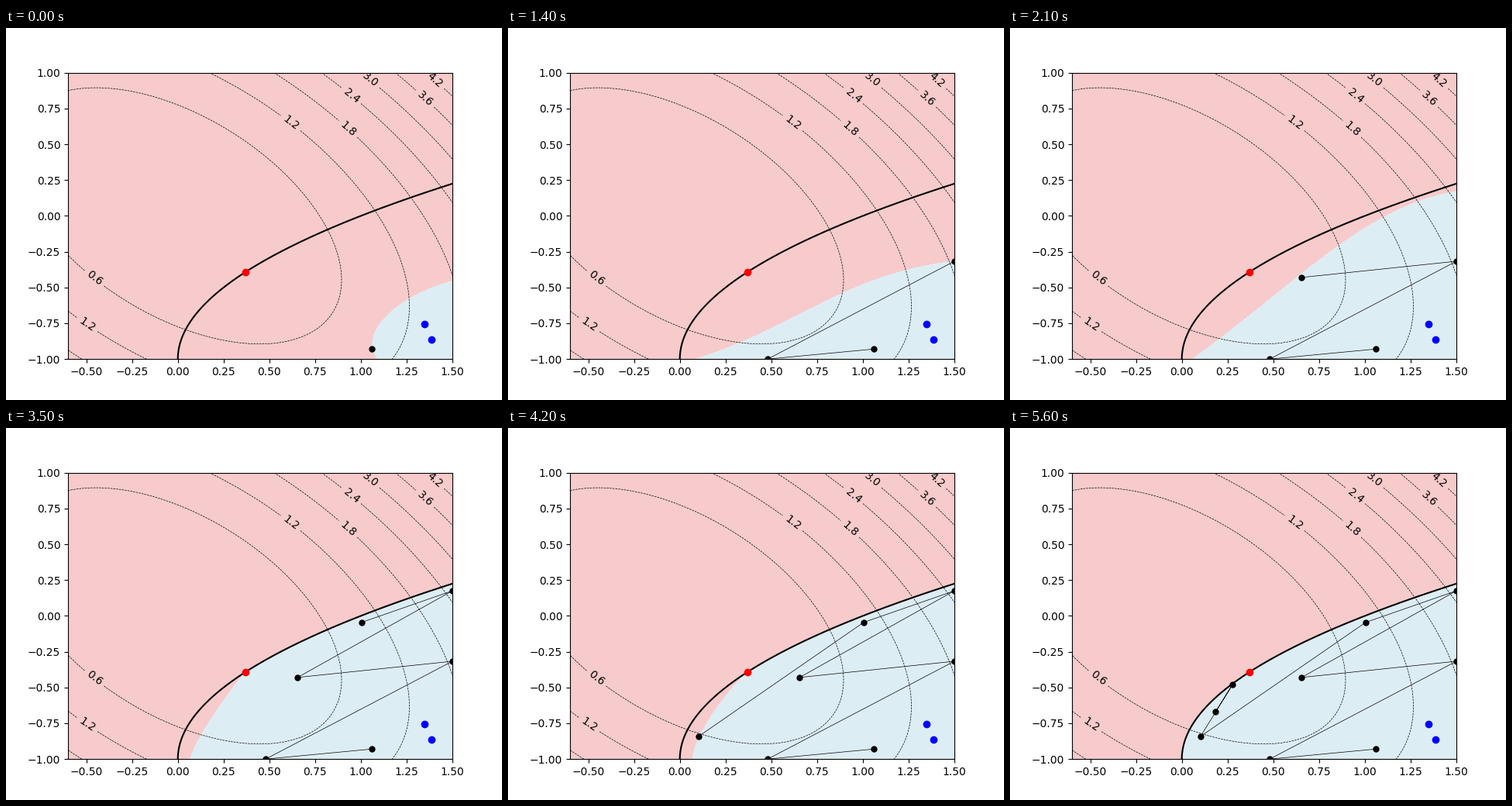
A matplotlib script for the animation above (6300 ms loop, 640x480 px).

```python
import numpy as np
import matplotlib.pyplot as plt
from matplotlib.animation import FuncAnimation

PINK, SKY = "#f7cbcb", "#ddedf4"
STEP_MS = 700
X_MIN, X_MAX = -0.6, 1.5

# The constraint curve is x = u^2, y = u - 1
U_END = np.sqrt(X_MAX)
Y_END = U_END - 1
# Minimum of x^2 + xy + y^2 along it
U_BEST = max(r.real for r in np.roots([4, 3, 0, -2]) if abs(r.imag) < 1e-9)
BEST = (U_BEST**2, U_BEST - 1)

# Sampled points, one more shown per step
PATH = np.array([
    (1.06, -0.93), (0.48, -1.0), (X_MAX, -0.317), (0.654, -0.43), (X_MAX, 0.175),
    (1.005, -0.045), (0.102, -0.842), (0.277, -0.48), (0.184, -0.67),
])
KNOWN = np.array([(1.348, -0.757), (1.386, -0.866)])


def bezier(ctrl):
    t = np.linspace(0, 1, 120)[:, None]
    pts = [np.array(p) * np.ones_like(t) for p in ctrl]
    while len(pts) > 1:
        pts = [a + (b - a) * t for a, b in zip(pts, pts[1:])]
    return pts[0]


def joint(u, v):
    """Where the constraint curve's tangents at u and v cross."""
    return (u * v, (u + v) / 2 - 1)


def spread(*ctrl):
    """Safe region whose edge runs straight to the right border."""
    return np.vstack([bezier(ctrl), (X_MAX, -1)])


def hug(*ctrl, top=Y_END):
    """Safe region whose edge meets the optimum, then follows the constraint."""
    tail = bezier([BEST, joint(U_BEST, U_END), (X_MAX, top)])
    return np.vstack([bezier([*ctrl, BEST]), tail, (X_MAX, -1)])


REGIONS = [
    spread((1.094, -1), (.99, -.84), (1.16, -.58), (X_MAX, -.455)),
    spread(PATH[1], (.8, -.83), (1.15, -.53), (X_MAX, -.395)),
    spread((.09, -1), (.65, -.77), (.9, -.41), PATH[2]),
    spread((.06, -1), (.66, -.44), (1, .06), (X_MAX, .17)),
    hug((.055, -1), (.19, -.83), (.3, -.58), top=PATH[4, 1]),
    hug((.068, -1), (.11, -.83), (.27, -.55)),
    hug((.07, -1), (.08, -.83), (.25, -.54)),
    hug((.01, -1), (.01, -.7)),
    hug((0, -1), joint(0, U_BEST)),
]

fig, ax = plt.subplots(figsize=(6.4, 4.8), dpi=100)
ax.set_facecolor(PINK)
ax.set_xlim(X_MIN, X_MAX)
ax.set_ylim(-1, 1)

safe = ax.fill(*REGIONS[0].T, fc=SKY, ec="none", antialiased=False, zorder=0.5)[0]

gx, gy = np.meshgrid(np.linspace(X_MIN, X_MAX, 200), np.linspace(-1, 1, 200))
cost = ax.contour(gx, gy, gx**2 + gx * gy + gy**2, levels=np.arange(1, 8) * 0.6,
                  colors="k", linewidths=0.5, linestyles="dashed")
ax.clabel(cost, fmt="%.1f", fontsize=10)

u = np.linspace(0, U_END, 300)
ax.plot(u**2, u - 1, "k-", lw=1.5)

trail, = ax.plot([], [], "ko-", lw=0.5, ms=5)
ax.plot(*KNOWN.T, "bo", ms=6)
ax.plot(*BEST, "ro", ms=6)


def draw(step):
    safe.set_xy(REGIONS[step])
    trail.set_data(*PATH[:step + 1].T)
    return safe, trail


anim = FuncAnimation(fig, draw, frames=len(PATH), interval=STEP_MS,
                     repeat=True, repeat_delay=0)
plt.show()
```
